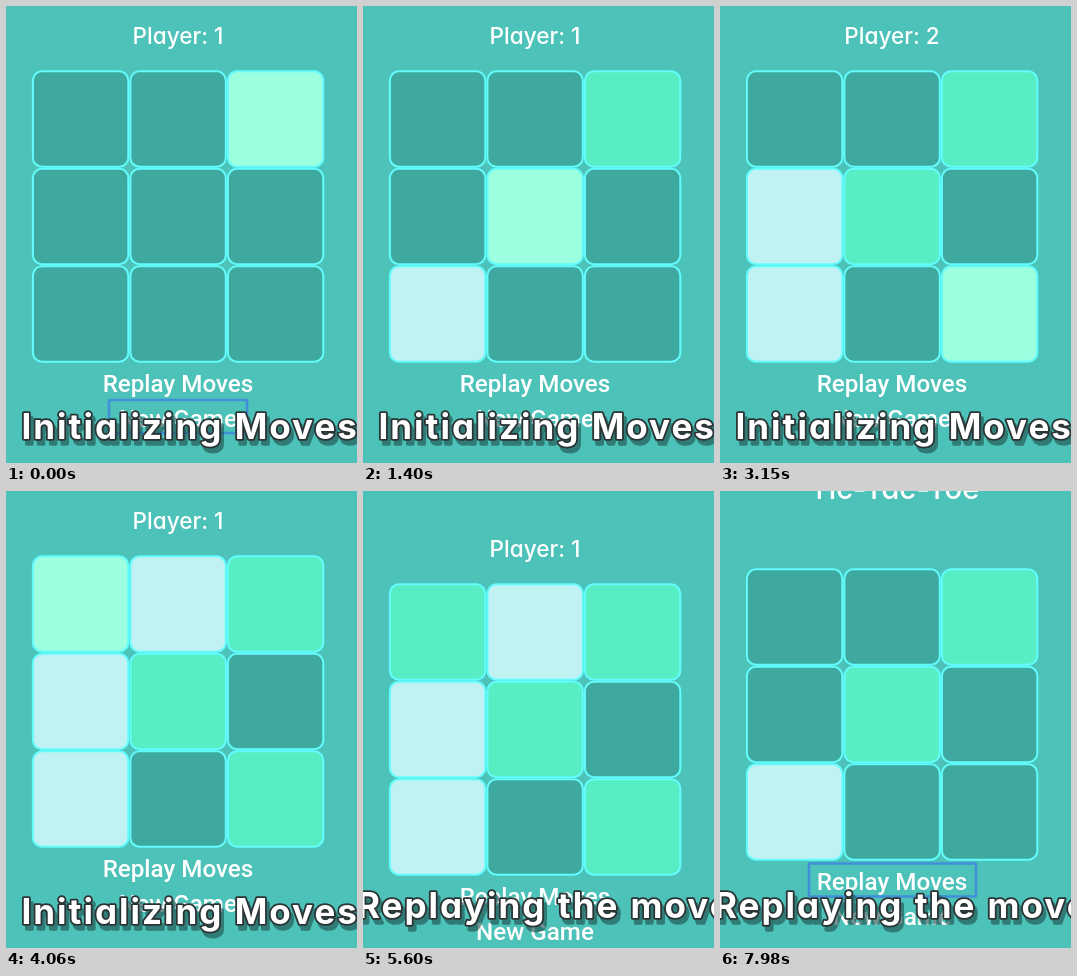
Recreate the animation shown at these times as an HTML page. Size 351 by 457 pixels, loop 8 s.

```html
<!DOCTYPE html>
<html lang="en">
<head>
<meta charset="utf-8">
<title>Board game replay</title>
<style>
  html, body { margin: 0; width: 100%; height: 100%; overflow: hidden; background: #4dc2b9; }
  svg { display: block; width: 351px; height: 457px; }
  text { fill: #fff; text-anchor: middle; }
  .head { font-family: Inter, Lato, sans-serif; font-weight: 500; font-feature-settings: "cv11"; }
  .button { font: 500 24.2px Roboto, "Open Sans", sans-serif; }
  .focus { fill: none; stroke: #3f90d8; stroke-width: 2.6; }
  .cell { stroke: #62fcfd; stroke-width: 2; }
  .caption text {
    font-family: Inter, Lato, sans-serif; font-size: 35px; font-weight: 700;
    font-feature-settings: "cv11"; letter-spacing: 2px; word-spacing: 1px;
    text-anchor: start; paint-order: stroke;
    stroke: #2b3435; stroke-width: 3.6; stroke-linejoin: round;
  }
  .caption .shade { fill: #1f4c4a; stroke: #1f4c4a; opacity: .6; }
</style>
</head>
<body>
<svg viewBox="0 0 351 457">
  <rect width="351" height="457" fill="#4dc2b9"/>
  <text id="title" class="head" x="174.5" y="8" font-size="29.3">Tic-Tac-Toe</text>
  <g id="page">
    <text id="player" class="head" x="172" y="-27" font-size="22.6"></text>
    <g id="board"></g>
    <text class="button" x="172" y="321">Replay Moves</text>
    <text class="button" x="172" y="355.8">New Game</text>
    <rect id="replayFocus" class="focus" x="89" y="294.5" width="167" height="33" rx="1"/>
    <rect id="newFocus" class="focus" x="103" y="329" width="138" height="33" rx="1"/>
  </g>
  <g id="caption" class="caption">
    <text class="shade" x="3" y="5"></text>
    <text></text>
  </g>
</svg>
<script>
const LOOP = 8000, WIN = 4130, REPLAY = 5950, CAPTION = 5600;
const EMPTY = '#3fa89f', HOVER = '#9bffe0', MARKS = ['#58eec4', '#c1f2f3'];
const PITCH = 97.5;

// Cells are numbered 0 to 8, row by row.
const moves = [[2, 350], [6, 1050], [4, 1780], [3, 2420], [8, 3080], [1, 3640], [0, WIN]];
const replayTimes = [REPLAY, 6790, 7630];
// [start, hovered cell]
const hovers = [[0, 2], [560, 4], [700, 6], [1260, 4], [2080, 3], [2640, 4],
  [2760, 8], [3300, 4], [3420, 1], [3860, 0], [4270, -1]];

const $ = id => document.getElementById(id);
const show = (el, on) => el.setAttribute('visibility', on ? 'visible' : 'hidden');
const latest = (list, t) => list.filter(([start]) => start <= t).pop();

const cells = Array.from({ length: 9 }, (_, i) => {
  const rect = document.createElementNS('http://www.w3.org/2000/svg', 'rect');
  const attrs = {
    class: 'cell', x: 26.9 + PITCH * (i % 3), y: 0.3 + PITCH * Math.floor(i / 3),
    width: 95.4, height: 95.4, rx: 9
  };
  for (const key in attrs) rect.setAttribute(key, attrs[key]);
  return $('board').appendChild(rect);
});

function setCaption(label, x, y) {
  $('caption').setAttribute('transform', `translate(${x} ${y})`);
  for (const line of $('caption').children) line.textContent = label;
}

function render(t) {
  const replaying = t >= REPLAY;
  const top = replaying ? 78 : t >= WIN ? 93 : 65;
  $('page').setAttribute('transform', `translate(0 ${top})`);

  const done = replaying
    ? replayTimes.filter(time => time <= t).length
    : moves.filter(([, time]) => time <= t).length;
  const fills = Array(9).fill(EMPTY);
  moves.slice(0, done).forEach(([cell], i) => { fills[cell] = MARKS[i % 2]; });
  const hovered = latest(hovers, t)[1];
  if (hovered >= 0) fills[hovered] = HOVER;
  cells.forEach((cell, i) => cell.setAttribute('fill', fills[i]));

  // The winner's name stays up after the last move.
  $('player').textContent = 'Player: ' + (t >= WIN ? 1 : done % 2 + 1);
  show($('player'), !replaying);
  show($('title'), replaying);
  show($('replayFocus'), replaying);
  show($('newFocus'), t < moves[0][1]);

  if (t < CAPTION) setCaption('Initializing Moves', 15.5, 432.5);
  else setCaption('Replaying the moves', -6, 426.5);
}

const begin = performance.now();
function tick() {
  render((performance.now() - begin) % LOOP);
  requestAnimationFrame(tick);
}
render(0);
requestAnimationFrame(tick);
</script>
</body>
</html>
```
